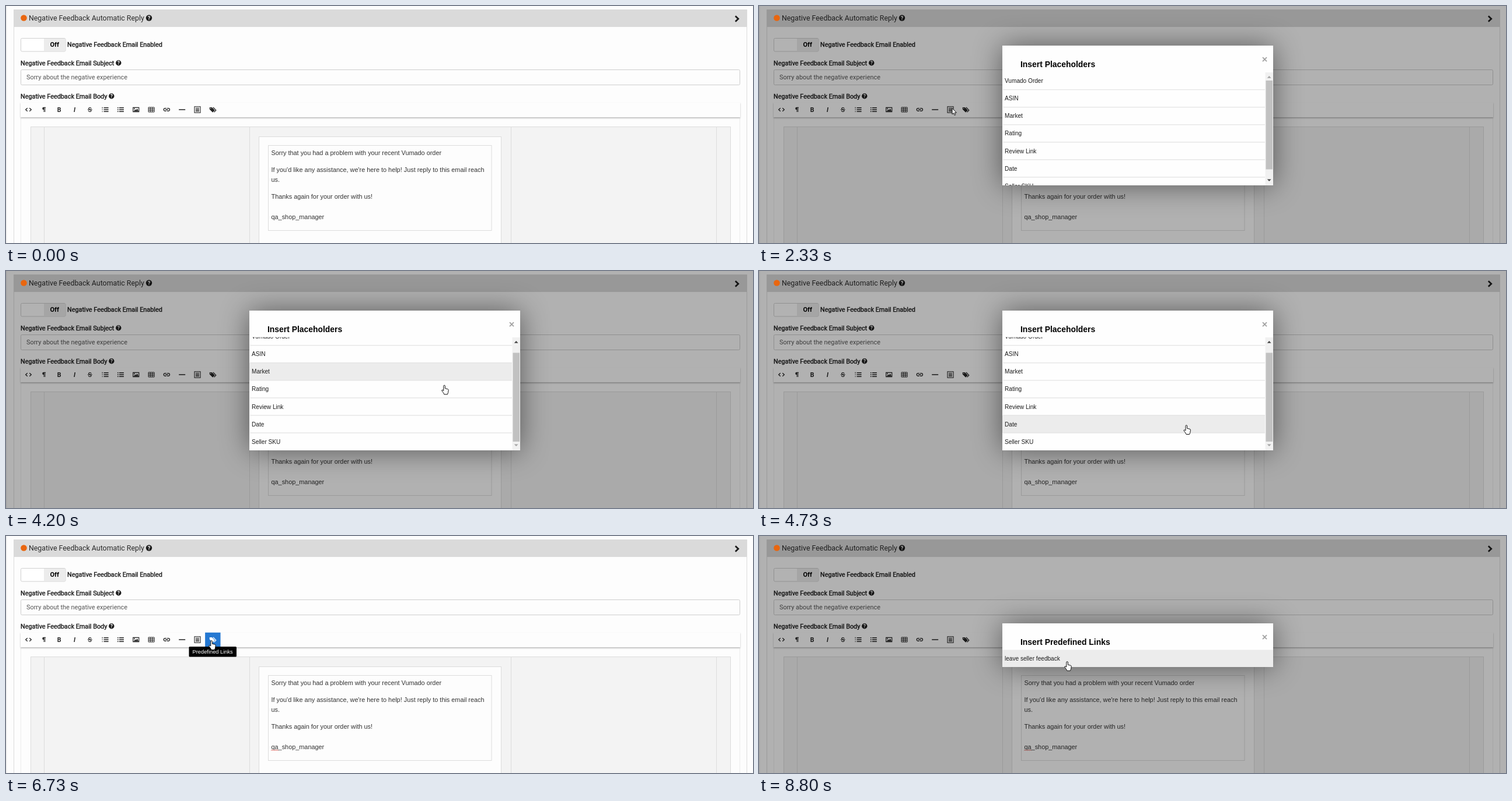
Write an HTML page that moves like this. It is 1280 px wide and 407 px high and loops after 9720 ms.

```html
<!DOCTYPE html>
<html lang="en">
<head>
<meta charset="utf-8">
<title>Automatic reply editor</title>
<style>
html, body { margin: 0; width: 100%; height: 100%; overflow: hidden; background: #fdfdfd; }
svg { display: block; width: 100%; height: 100%; }
text { white-space: pre; }
.ui { font-family: Roboto, sans-serif; }
.doc { font-family: "Liberation Sans", Arial, sans-serif; }
.label { font-size: 10.85px; fill: #1c1c1c; stroke: #1c1c1c; stroke-width: .4px; }
.body { font-size: 10.88px; fill: #333; }
.row { font-size: 10.1px; fill: #1b1b1b; }
.heading { font-size: 13.9px; font-weight: 700; fill: #000; }
.tip { font-size: 9.3px; fill: #fff; }
.line { fill: none; stroke: currentColor; }
</style>
</head>
<body>
<svg id="stage" viewBox="0 0 1280 407" preserveAspectRatio="none">
  <defs>
    <filter id="soft" filterUnits="userSpaceOnUse" x="200" y="-150" width="900" height="700"><feGaussianBlur stdDeviation="25"/></filter>
    <filter id="thin" filterUnits="userSpaceOnUse" x="0" y="150" width="1280" height="60"><feGaussianBlur stdDeviation="1.2"/></filter>
    <clipPath id="listClip"><rect x="417" y="113.5" width="464" height="194.5"/></clipPath>
  </defs>
  <g id="page"></g>
  <g id="toolbar"></g>
  <g id="tooltip"></g>
  <rect id="shade" width="1280" height="407"/>
  <circle cx="30.5" cy="20.5" r="5.3" fill="#e9660f"/>
  <g id="placeholders"></g>
  <g id="links"></g>
  <g id="cursor"></g>
</svg>
<script>
const LOOP = 9720;
const ROW = 30.05, LIST_TOP = 113.7, MAX_SCROLL = 16;
const $ = id => document.getElementById(id);

const rect = (x, y, w, h, fill, stroke = 'none', rx = 0) =>
  `<rect x="${x}" y="${y}" width="${w}" height="${h}" rx="${rx}" fill="${fill}" stroke="${stroke}"/>`;
const text = (x, y, str, cls, extra = '') => `<text x="${x}" y="${y}" class="${cls}" ${extra}>${str}</text>`;
const line = (d, width = 1.2) => `<path class="line" d="${d}" stroke-width="${width}"/>`;
const solid = d => `<path fill="currentColor" d="${d}"/>`;
const help = (x, y, r) => `<circle cx="${x}" cy="${y}" r="${r}" fill="#1c1c1c"/>` +
  text(x, y + r * .66, '?', 'ui', `text-anchor="middle" font-size="${r * 1.8}" font-weight="700" fill="#fff"`);

function buildPage() {
  const border = '#dcdcdc', cell = '#f3f3f3';
  $('page').innerHTML = [
    rect(0, 0, 1280, 407, '#fdfdfd'),
    rect(0, 0, 1.5, 407, '#ececec'),
    rect(13.5, 6.5, 1256, 410, '#fdfdfd', border),
    rect(13, 6, 1257, 30, '#dadada'),
    text(39, 25, 'Negative Feedback Automatic Reply', 'ui', 'font-size="12.36" fill="#2b2b2b"'),
    help(245, 20.5, 5.2),
    '<path d="M1249.8 17.2l5 4.8l-5 4.8" fill="none" stroke="#1c1c1c" stroke-width="2.7"/>',

    rect(25.5, 55.5, 76.5, 22.5, '#fff', '#d0d0d0', 2),
    rect(65, 56, 36.5, 21.5, '#ececec'),
    text(75.5, 70.3, 'Off', 'ui', 'font-size="11" font-weight="700" fill="#000"'),
    text(105, 69.8, 'Negative Feedback Email Enabled', 'ui label'),
    text(25, 101.7, 'Negative Feedback Email Subject', 'ui label'),
    help(192.8, 97.8, 4.7),
    rect(25.5, 109.5, 1232, 26, '#fdfdfd', '#cdcdcd', 2),
    text(35, 126.2, 'Sorry about the negative experience', 'ui', 'font-size="10.9" fill="#555"'),
    text(25, 158.7, 'Negative Feedback Email Body', 'ui label'),
    help(180.8, 154.8, 4.7),

    rect(25.5, 190, 1232, 230, '#fdfdfd', '#ececec'),
    `<g filter="url(#thin)">${rect(25, 167, 1233, 25.5, '#b4b4b4')}</g>`,
    rect(25, 165.5, 1233, 25.5, '#fdfdfd'),

    rect(42.5, 207.5, 1199, 220, cell, border),
    rect(65.5, 207.5, 1152, 220, cell, border),
    rect(417.5, 207.5, 448, 220, cell, border),
    rect(433.5, 224.5, 415, 200, '#fdfdfd', border),
    rect(449.5, 239.5, 382.5, 146, '#fdfdfd', border),
    text(454.5, 256.3, 'Sorry that you had a problem with your recent Vumado order', 'doc body'),
    text(454.5, 285.3, 'If you\'d like any assistance, we\'re here to help! Just reply to this email reach', 'doc body'),
    text(454.5, 302.3, 'us.', 'doc body'),
    text(454.5, 331.3, 'Thanks again for your order with us!', 'doc body'),
    text(454.5, 365.8, 'qa_shop_manager', 'doc body'),
    '<path id="squiggle" d="M454.5 368.5l1.5 -1.5l1.5 1.5l1.5 -1.5l1.5 1.5l1.5 -1.5l1.5 1.5l1.5 -1.5l1.5 1.5" fill="none" stroke="#d0453c" stroke-width=".9"/>'
  ].join('');
}

// Icons are drawn around their own centre.
const glyph = (str, extra) => text(0, 3.8, str, 'ui', `text-anchor="middle" font-size="10.5" fill="currentColor" ${extra}`);
const listLines = line('M-2.5 -3.2h8M-2.5 0h8M-2.5 3.2h8', 1.5);
const icons = [
  line('M-1.8 -2.8l-3 2.8l3 2.8M1.8 -2.8l3 2.8l-3 2.8', 1.3),
  solid('M-.2 -4.2h3.4v1h-.7v7.2h-1v-7.2h-.8v7.2h-1v-3.7a2.2 2.2 0 0 1 0 -4.5z'),
  glyph('B', 'font-weight="700"'),
  glyph('I', 'font-weight="700" font-style="italic"'),
  glyph('S', 'font-weight="500"') + line('M-4 0h8', 1),
  listLines + line('M-5 -4.2v2M-5.6 0h1.4M-5.6 3.2h1.4', 1.1),
  listLines + line('M-5.5 -3.2h1.7M-5.5 0h1.7M-5.5 3.2h1.7', 1.6),
  line('M-5 -3.7h10v7.4h-10z', 1.2) + solid('M-4 2.8l2.6 -3.2l1.5 1.5l2 -3l2.2 4.7z') + '<circle cx="-2.6" cy="-1.7" r="1" fill="currentColor"/>',
  line('M-5 -4h10v8h-10zM-5 -1.3h10M-5 1.3h10M-1.7 -4v8M1.7 -4v8', 1),
  line('M-.6 -2.3h-2.2a2.3 2.3 0 0 0 0 4.6h2.2M.6 -2.3h2.2a2.3 2.3 0 0 1 0 4.6h-2.2M-2.2 0h4.4', 1.3),
  line('M-5.5 0h11', 1.5),
  line('M-5 -5.2h10v10.4h-10z', 1.1) + line('M-3 -2.7h6M-3 -.8h6M-3 1.1h6M-3 3h6', 1.1),
  solid('M-5.5 -4h4l5 5l-3.7 3.7l-5.3 -5.2z') + line('M.6 -4l4.8 4.9l-3.2 3.5', 1.3) + '<circle cx="-3.5" cy="-2.2" r=".8" fill="#fff"/>'
];
const iconX = i => 38.5 + 26.32 * i;

function buildToolbar() {
  $('toolbar').innerHTML = icons.map((art, i) =>
    `<g transform="translate(${iconX(i)} 178)" color="#222">${rect(-13.2, -12.2, 26.4, 25, 'none')}${art}</g>`).join('');
}

function modalFrame(y, h, title) {
  const close = `M863 ${y + 20.2}l7 7m0 -7l-7 7`;
  return `<g filter="url(#soft)" opacity=".5">${rect(417, y + 1, 464, h, '#000')}</g>` +
    rect(417, y, 464, h, '#fefefe') +
    text(448, y + 37, title, 'doc heading') +
    `<path d="${close}" stroke="#a2a2a2" stroke-width="1.8"/>`;
}

function buildModals() {
  const names = ['Vumado Order', 'ASIN', 'Market', 'Rating', 'Review Link', 'Date', 'Seller SKU'];
  const rows = names.map((name, i) => {
    const y = LIST_TOP + ROW * i;
    return text(421, y + 18.6, name, 'doc row') +
      (i < names.length - 1 ? rect(418, y + ROW - .7, 449, 1.3, '#e4e4e4') : '');
  }).join('');
  $('placeholders').innerHTML = modalFrame(68, 240, 'Insert Placeholders') +
    `<g clip-path="url(#listClip)"><g id="list"><rect id="rowHover" x="417" width="450" height="${ROW}" fill="#ececec"/>${rows}</g></g>` +
    rect(867.5, 114, 13.5, 194, '#f1f1f1') +
    '<rect id="thumb" x="868.5" width="11.5" height="152.5" fill="#c1c1c1"/>' +
    '<path id="up" d="M870.8 123.7l3.4 -3.6l3.4 3.6z"/><path id="down" d="M870.8 297.4l3.4 3.6l3.4 -3.6z"/>';
  $('links').innerHTML = modalFrame(150, 75, 'Insert Predefined Links') +
    '<rect id="linkHover" x="417" y="195.5" width="464" height="29.5" fill="#ececec"/>' +
    text(421, 213.6, 'leave seller feedback', 'doc row');
}

const outline = 'stroke="#111" stroke-width="1" stroke-linejoin="round" fill="#fff"';
const cursors = {
  arrow: `<path d="M.5 .5v10.5l2.4 -2.2l1.6 3.8l1.8 -.8l-1.6 -3.6h3.2z" ${outline}/>`,
  hand: `<path d="M-1.2 9.5v-8a1.3 1.3 0 0 1 2.6 0v4.2l4.4 1q1.4 .4 1.4 1.8l-.6 4.2l-1.2 3.2h-5.6l-1.2 -2.6l-2.8 -3.6q-.4 -1.6 1.2 -1.4z" ${outline}/>`,
  beam: '<path d="M1 .5h2l1 1l1 -1h2M4 1.5v10M1 12.5h2l1 -1l1 1h2" fill="none" stroke="#222"/>'
};

// time, x, y of the pointer tip; it eases between stops.
const path = [
  [30, 706, 354], [330, 688, 267], [940, 688, 267], [1260, 330.5, 175],
  [2600, 330.5, 175], [3600, 735, 188], [3940, 751, 196], [4250, 751, 196],
  [4600, 735, 250], [4930, 727, 292], [5340, 727, 292], [5660, 706, 354],
  [6000, 706, 354], [6640, 352, 179.5], [7940, 352, 179.5], [8660, 528, 215.5]
];
const clamp = v => Math.max(0, Math.min(1, v));
const ramp = (t, a, b) => clamp((t - a) / (b - a));
const smooth = k => k * k * (3 - 2 * k);

function pointer(t) {
  const next = path.findIndex(p => p[0] > t);
  if (next < 0) return path[path.length - 1].slice(1);
  if (next === 0) return path[0].slice(1);
  const [t0, x0, y0] = path[next - 1], [t1, x1, y1] = path[next];
  const k = smooth(ramp(t, t0, t1));
  return [x0 + (x1 - x0) * k, y0 + (y1 - y0) * k];
}

const buttons = [
  { index: 11, press: 1530, done: 1800, tip: 'Placeholders', tipX: 295, tipW: 66, tipY: 190.5 },
  { index: 12, press: 6930, done: 7200, tip: 'Predefined Links', tipX: 313.5, tipW: 81.5, tipY: 190 }
];

function drawButtons(t, x, y) {
  let state = '';
  $('tooltip').innerHTML = '';
  for (const b of buttons) {
    const group = $('toolbar').children[b.index];
    const over = t < b.done && Math.abs(x - iconX(b.index)) < 13.2 && y > 165 && y < 191;
    const pressed = t >= b.press;
    group.setAttribute('color', over && !pressed ? '#fff' : '#222');
    group.firstChild.setAttribute('fill', !over ? 'none' : pressed ? '#c3c3c3' : '#2478d2');
    if (!over) continue;
    state = pressed ? 'pressed' : 'hover';
    $('tooltip').innerHTML = rect(b.tipX, b.tipY, b.tipW, 17.5, '#000', 'none', 1.5) +
      text(b.tipX + 6, b.tipY + 12, b.tip, 'doc tip');
  }
  return state;
}

function draw(t) {
  const [x, y] = pointer(t);
  const first = ramp(t, 1740, 2060) * (1 - ramp(t, 5930, 6200));
  const second = ramp(t, 7140, 7460);
  $('shade').setAttribute('opacity', .3 * Math.max(first, second));
  for (const [id, opacity] of [['placeholders', first], ['links', second]]) {
    $(id).setAttribute('opacity', opacity);
    $(id).setAttribute('visibility', opacity > 0 ? 'visible' : 'hidden');
  }

  const scroll = MAX_SCROLL * smooth(ramp(t, 4000, 4170));
  $('list').setAttribute('transform', `translate(0 ${-scroll})`);
  $('thumb').setAttribute('y', 128 + scroll * .78);
  $('up').setAttribute('fill', scroll > 0 ? '#444' : '#a3a3a3');
  $('down').setAttribute('fill', scroll < MAX_SCROLL ? '#444' : '#a3a3a3');

  // The highlighted row is only re-evaluated once the pointer moves after scrolling.
  const hitScroll = t > 4250 ? MAX_SCROLL : 0;
  const onRow = first === 1 && x > 417 && x < 867 && y > LIST_TOP && y < 308;
  const row = Math.floor((y + hitScroll - LIST_TOP) / ROW);
  $('rowHover').setAttribute('y', LIST_TOP + ROW * row);
  $('rowHover').setAttribute('opacity', onRow ? 1 : 0);

  const onLink = second === 1 && x > 417 && y > 195.5 && y < 225;
  $('linkHover').setAttribute('opacity', onLink ? 1 : 0);
  $('squiggle').setAttribute('opacity', t >= 6200 ? 1 : 0);

  const button = drawButtons(t, x, y);
  const inEditor = !first && !second && y > 192;
  const shape = onRow || onLink || button === 'hover' ? 'hand' : inEditor ? 'beam' : 'arrow';
  $('cursor').innerHTML = t < 60 ? '' : cursors[shape];
  $('cursor').setAttribute('transform', `translate(${x} ${y})`);
}

buildPage();
buildToolbar();
buildModals();
const start = performance.now();
function tick() {
  draw((performance.now() - start) % LOOP);
  requestAnimationFrame(tick);
}
tick();
</script>
</body>
</html>
```
